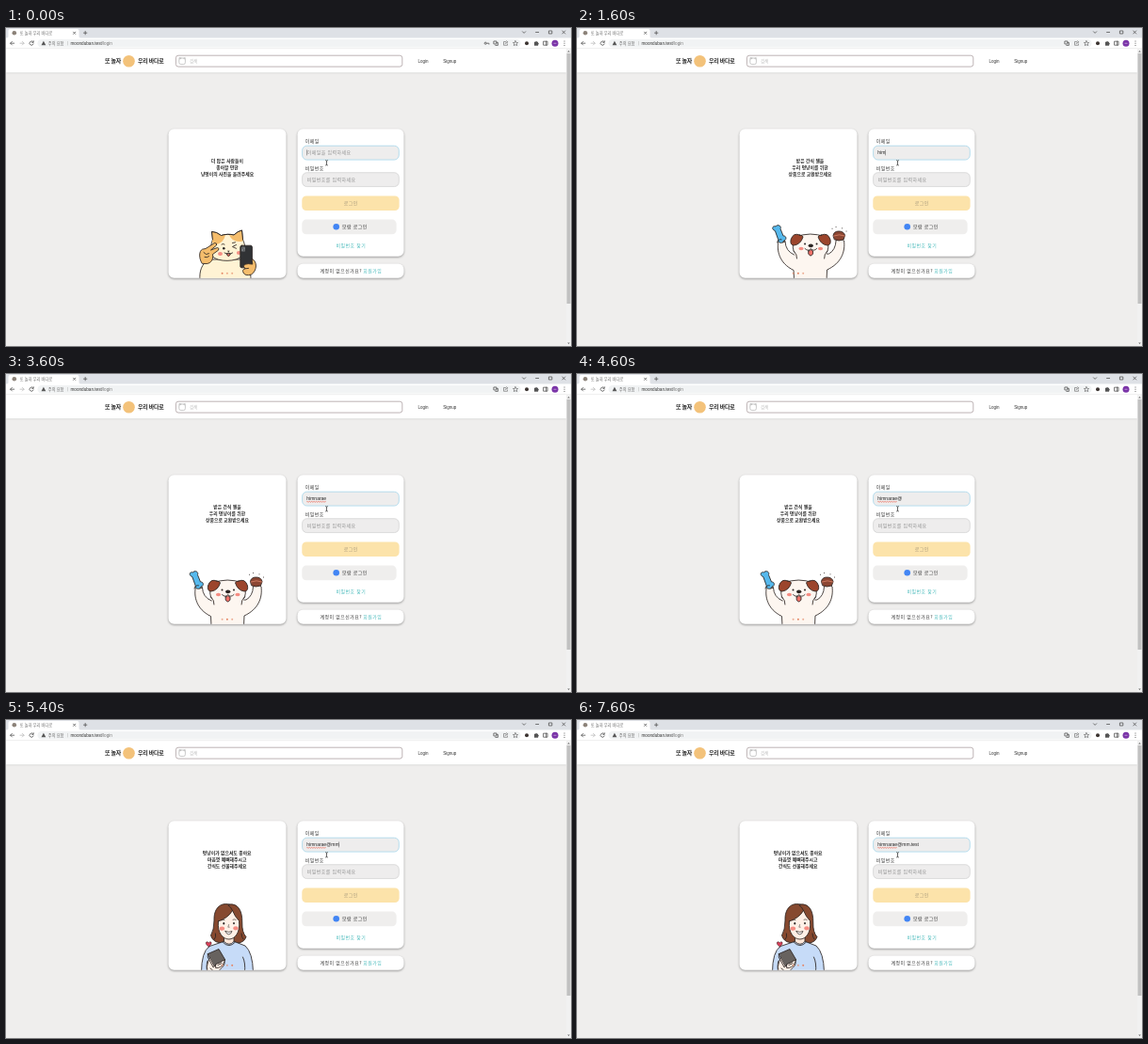
An HTML page that plays this animation: 600x338 px, repeating every 8000 ms.

```html
<!DOCTYPE html>
<html lang="ko">
<head>
<meta charset="utf-8">
<title>또 놀자 우리 바다로</title>
<style>
  html, body { margin: 0; width: 100%; height: 100%; overflow: hidden; background: #efeeed; }
  svg { display: block; width: 100vw; height: 100vh; }
  text { font-family: "Noto Sans CJK KR", "Noto Sans CJK", "Noto Sans", sans-serif; fill: #333; white-space: pre; }
  .ui { font-size: 4.9px; letter-spacing: .5px; }
  .latin { font-family: "Liberation Sans", Arial, sans-serif; }
  .small { font-size: 4.2px; fill: #666; }
  .mid { text-anchor: middle; }
  .hand { font-size: 4.8px; font-weight: 700; letter-spacing: .04px; fill: #222; text-anchor: middle; }
  .brand { font-size: 6px; font-weight: 700; letter-spacing: -.3px; fill: #222; }
  .hint { fill: #8d8d8d; }
  .link { fill: #45b9ba; }
  .card { fill: #fff; filter: drop-shadow(0 1px 1.1px rgba(0,0,0,.36)); }
  .icon { fill: none; stroke: #555; stroke-width: .8; stroke-linecap: round; stroke-linejoin: round; }
  .pale { stroke: #bbb; }
  .art { stroke: #2b2422; stroke-width: .85; stroke-linecap: round; stroke-linejoin: round; }
  .line { fill: none; }
  .flat { stroke: none; }
  .ink { fill: #2b2422; stroke: none; }
  .blush { fill: #f58d83; stroke: none; }
  #strip { animation: strip 8s infinite; }
  @keyframes strip {
    0% { transform: translateX(0); }
    16.125% { transform: translateX(0); animation-timing-function: ease; }
    22.375% { transform: translateX(-125px); }
    58.75% { transform: translateX(-125px); animation-timing-function: cubic-bezier(.2,.85,.3,1); }
    65%, 100% { transform: translateX(-250px); }
  }
</style>
</head>
<body>
<svg viewBox="0 0 600 338" preserveAspectRatio="none">
  <defs>
    <clipPath id="frame"><rect x="172.5" y="107.3" width="125" height="158.5" rx="6"/></clipPath>
  </defs>
  <rect width="600" height="338" fill="#efeeed"/>

  <!-- site header -->
  <rect y="22" width="595" height="25.3" fill="#fff" style="filter:drop-shadow(0 .5px .8px rgba(0,0,0,.18))"/>
  <text class="brand" x="105" y="37.3">또 놀자</text>
  <circle cx="130.5" cy="35.2" r="6.3" fill="#f3c27a"/>
  <text class="brand" x="140" y="37.3">우리 바다로</text>
  <rect x="180.4" y="29.2" width="240.4" height="11.9" rx="2.6" fill="#fff" stroke="#aca0a1" stroke-width=".8"/>
  <rect class="icon pale" x="183.8" y="32" width="6.6" height="6.6" rx="2"/>
  <path class="icon pale" d="M184 33v-1.6l1.6.8M190.2 33v-1.6l-1.6.8"/>
  <text class="small" x="195.3" y="36.6" style="fill:#b5b5b5">검색</text>
  <text class="latin" x="437.5" y="36.8" font-size="4.5">Login</text>
  <text class="latin" x="464.3" y="36.8" font-size="4.5">Signup</text>

  <!-- browser bar -->
  <rect width="600" height="11" fill="#dee1e6"/>
  <path d="M0 11q2.5 0 2.500-2.500V3q0-2 2-2H75.500q2 0 2 2v5.500q0 2.500 2.500 2.500z" fill="#fff"/>
  <rect y="10.500" width="600" height="11.300" fill="#fff"/>
  <rect y="21.700" width="600" height=".4" fill="#dcdcdc"/>
  <circle cx="8.800" cy="5.200" r="2.300" fill="#8b8178"/>
  <text class="small" x="14.800" y="6.800">또 놀자 우리 바다로</text>
  <path class="icon" d="M71.500 4.200l2.200 2.200m0-2.200l-2.200 2.200M82.500 5.200h3.400m-1.700-1.700v3.400"/>
  <path class="icon" d="M548.500 3.800l1.600 1.600 1.600-1.600M562.600 4.500h3M576.800 3h3v3h-3zM590.800 3l3 3m0-3l-3 3"/>
  <path class="icon" d="M8.700 16.200H4.600m1.800-1.800l-1.800 1.800 1.800 1.800"/>
  <path class="icon pale" d="M15 16.200h4.100m-1.800-1.800l1.800 1.800-1.800 1.800"/>
  <path class="icon" d="M28.900 15a2.100 2.100 0 1 0 .2 1.900M29.200 13.700V15.300h-1.600"/>
  <rect x="33.500" y="12" width="513" height="8.600" rx="4.300" fill="#f1f3f4"/>
  <path d="M39.900 13.800l2.400 4.400h-4.800z" fill="#555"/>
  <text class="small" x="44.800" y="17.800">주의 요함</text>
  <rect x="65.400" y="14" width=".4" height="4.400" fill="#aaa"/>
  <text class="latin" x="68.500" y="17.700" font-size="4.650">moonduban.test<tspan fill="#777">/login</tspan></text>
  <path id="key" class="icon" d="M510.300 16.200a1.100 1.100 0 1 0-2.200 0 1.100 1.100 0 1 0 2.200 0h2.600v1"/>
  <path class="icon" d="M518.300 14h2.600v3h-2.600zM520.900 15.400h1.500v3h-2.600"/>
  <path class="icon" style="stroke:#888" d="M530.500 14.500h-2v3.800h4v-1.300M530 16.800q.3-2 2.700-2m-1.100-1.100l1.200 1.100-1.200 1.100"/>
  <path class="icon" style="stroke-width:.6" d="M541 13.700l.8 1.700 1.800.2-1.300 1.200.4 1.800-1.700-.9-1.700.9.400-1.800-1.300-1.200 1.800-.2z"/>
  <circle cx="553" cy="16.300" r="2" fill="#3c3431"/>
  <path d="M561 14.700h1.300a.8.800 0 1 1 1.600 0h1.200v1.300a.8.800 0 1 1 0 1.600v1.200H561z" fill="#555"/>
  <path class="icon" d="M571 14.200h4v4h-4zM573.600 14.200v4"/>
  <circle cx="583" cy="16.200" r="3.500" fill="#7b35a8"/>
  <path d="M581.500 16.300h3" stroke="#d9c4e6" stroke-width=".6"/>
  <path class="icon" style="stroke-width:1" d="M593 14v.1M593 16.200v.1M593 18.400v.1"/>

  <rect x="595" y="22" width="5" height="316" fill="#f1f1f1"/>
  <rect x="595.500" y="27" width="4" height="266" fill="#c1c1c1"/>
  <path d="M596.200 25.500l1.300-1.600 1.300 1.600zM596.200 334.500l1.300 1.600 1.300-1.600z" fill="#666"/>

  <!-- carousel -->
  <rect class="card" x="172.500" y="107.300" width="125" height="158.500" rx="6"/>
  <g clip-path="url(#frame)">
    <g id="strip">
      <g>
        <text class="hand" x="235" y="143.200">더 많은 사람들이</text>
        <text class="hand" x="235" y="150">좋아할 만한</text>
        <text class="hand" x="235" y="156.700">냥멍이의 사진을 올려주세요</text>
        <g class="art">
          <path d="M206 268C205 258 208 251 215 246H252C258 250 260 258 260 268z" fill="#fff3d4"/>
          <path d="M218.500 240C217 233 218 228 219.500 225L218.500 216.500Q223.500 216.500 228.500 220.500C233 219 238 219 242 220Q246 216 250.500 215L251.500 225C254.500 231 254.500 237 251 242C245 249 225 249 219.500 243z" fill="#fff3d4"/>
          <path class="flat" d="M219 227.500L219 217Q224 217 228.500 220.800L233 220Q231 229 222 230.500z" fill="#f5bd6c"/>
          <path class="flat" d="M237 220L242 220.500Q246 216.500 250.200 215.500L251.500 226.500Q241 229 237 220z" fill="#f5bd6c"/>
          <path class="line" d="M219.500 225L218.500 216.500Q223.500 216.500 228.500 220.500C233 219 238 219 242 220Q246 216 250.500 215L251.500 225"/>
          <circle class="ink" cx="231.300" cy="234.300" r="1.300"/>
          <path class="line" d="M244.500 230.500l-4 2 4 1.800M229 230q1.500-1.200 3 0M240.500 228.500l3-.7M232 239q2.500 2 4.300 0 2 2 4.300 0"/>
          <path class="ink" d="M234.900 236.800h2.800l-1.400 1.500z"/>
          <path d="M234.300 240.200q2 5 4 0z" fill="#e8685c"/>
          <ellipse class="blush" cx="227.500" cy="240" rx="2.500" ry="1.900"/>
          <ellipse class="blush" cx="247.300" cy="239" rx="2.400" ry="1.900"/>
          <path d="M208 250C204.500 244 205 237 208.500 235.200L212 234.500L221.500 228.500Q224.500 228.500 223.500 231L217.500 236L224.500 233.500Q227 234 225.500 236.200L219.500 240.500C220.500 245.500 218 250 213.500 250.500z" fill="#f5bd6c"/>
          <path class="line" d="M210 238.500l2.500 2 3-.8M211 243.500q2.500 1 4.500-.8"/>
          <rect x="248.800" y="231.200" width="12.600" height="23.600" rx="1.600" fill="#303235"/>
          <rect class="flat" x="250" y="232.600" width="4" height="5" rx="1.200" fill="#75797d"/>
          <path d="M251.300 234v.1M252.800 236v.1" stroke="#111"/>
          <path d="M261.400 245.500C267 247.500 267 258 260.500 262Q254 264 252 260Q250.500 256.500 254 255.800Q251 253 253.500 251.300Q257 250 261.400 251z" fill="#f5bd6c"/>
          <path class="line" d="M254 255.800l3.500-.4"/>
        </g>
      </g>

      <g transform="translate(125)">
        <text class="hand" x="235" y="143.200">받은 간식 젤을</text>
        <text class="hand" x="235" y="150">우리 멍냥이를 위한</text>
        <text class="hand" x="235" y="156.700">상품으로 교환받으세요</text>
        <g class="art">
          <path d="M201.500 226C199 236 202 250 217.500 257.500L218 268H252.500L253 257C268 250 272.500 238 271 226Q267 221 262.500 226Q262 236 255 240L218 241Q209 237 208.500 227Q205 222 201.500 226z" fill="#fdf6f0"/>
          <path d="M197.500 215.500C193.500 214 195 209.500 198.500 211C199.500 208.500 205 209.500 203.500 213.500L206.500 221C210 220.500 210.500 225.500 207 226C206.500 229.500 200.500 229 201 225z" fill="#56b9ed"/>
          <path class="line" d="M200 228Q201 224 204.500 224.800M206 228l2.500-1"/>
          <path d="M259.500 220.500Q260 216 265.500 216Q271 216 272 220.500L270.500 225Q265.500 227 261 225z" fill="#8b4633"/>
          <path class="line" d="M260 221Q266 218.500 272 221" stroke="#d98268"/>
          <path class="line" d="M258.500 213.200v.1M262.500 211.500v.1M273.500 216v.1M269 212.800v.1"/>
          <path d="M220 222Q235 216 251 222Q256 229 253.500 237Q248 244.500 235 244.500Q222 244 217.500 237Q215 229 220 222z" fill="#fdf6f0"/>
          <path class="flat" d="M218.500 238.500H252.500L251.500 250H219z" fill="#fdf6f0"/>
          <path class="line" d="M217.500 237q4 3.500 3.500 8M253.500 237q-4 3.500-3.500 8"/>
          <path id="ear" d="M224 220Q217 217 214.500 225Q213.500 231 218 231Q225 230 227.500 222Q227 220 224 220z" fill="#9c452c"/>
          <use href="#ear" transform="matrix(-1 0 0 1 471 0)"/>
          <circle class="ink" cx="229.500" cy="229.500" r="1"/>
          <circle class="ink" cx="242" cy="229.500" r="1"/>
          <ellipse class="ink" cx="235.700" cy="231.300" rx="2.600" ry="1.900"/>
          <path class="line" d="M229.500 234.500q3.500 3.500 6.200 0 3 3.500 6.300 0"/>
          <path d="M233.200 237v3q2.300 4 4.800 0V237q-1.500-.5-2.300-1.500-.8 1.500-2.500 1.500z" fill="#ef7068"/>
          <ellipse class="blush" cx="225.500" cy="234.500" rx="2.600" ry="1.800"/>
          <ellipse class="blush" cx="246" cy="234.500" rx="2.600" ry="1.800"/>
        </g>
      </g>

      <g transform="translate(250)">
        <text class="hand" x="234.700" y="143.200">멍냥이가 없으셔도 좋아요</text>
        <text class="hand" x="234.700" y="150">마음껏 예뻐해주시고</text>
        <text class="hand" x="234.700" y="156.700">간식도 선물해주세요</text>
        <g class="art">
          <path d="M237 196C227 193.500 220.500 201 221 213Q221 223 217.500 229Q219.500 235.500 226 236.500L247 237Q253 236 255 230.500Q250.500 226 250.800 215C251 202 246 194.500 237 196z" fill="#86492f"/>
          <path d="M207.500 268Q207.500 246.500 216 240.500L231 235.500H242.500L254 240Q262 247 262.500 268z" fill="#c6dbf8"/>
          <path d="M231.500 228v7.500Q237 241 242 235.500V227z" fill="#fde6d8"/>
          <path class="line" d="M230 236Q237 243.500 243.500 236"/>
          <path d="M225.500 214C224 227 231 233 236.800 233C243 233 249 226 247.500 213.500Q243 209 240.500 202.500Q236 210.500 225.500 214z" fill="#fff0e6"/>
          <path class="line" d="M240.500 202.500Q239 198.500 236 197M222.500 227q1 4-1.500 6.500M250 227q0 4 2 6"/>
          <path class="line" d="M228.800 212.800q1.600-1.100 3.200-.3M241 212.200q1.600-1 3.200.2" style="stroke-width:.6"/>
          <ellipse class="ink" cx="231.300" cy="216.300" rx=".9" ry="1.200"/>
          <ellipse class="ink" cx="242" cy="216.100" rx=".9" ry="1.200"/>
          <path class="line" d="M236.600 217.500l-.8 2.700h1.400" style="stroke-width:.5"/>
          <ellipse class="blush" cx="229.500" cy="221.700" rx="2.700" ry="2.100"/>
          <ellipse class="blush" cx="244" cy="221.300" rx="2.700" ry="2.100"/>
          <path d="M233 224.500q4 1.800 7 0-1 3.300-3.500 3.300t-3.500-3.300z" fill="#fff" style="stroke-width:.7"/>
          <path d="M215.300 241Q211 237.800 212.700 236Q214.500 235 215.300 237Q216.500 235 218 236.200Q219.200 238 215.300 241z" fill="#d9405a" stroke-width=".5"/>
          <path class="line" d="M253.500 268Q254.500 258 251.500 252M214 256Q212.500 260 213.500 268"/>
          <path d="M214 268Q212.500 262 214.500 257L217 251L231 253Q234 259 229.500 263L224.500 268z" fill="#fff0e6"/>
          <path d="M214.500 248.500L226 243.500L232.800 255L221.500 261.500z" fill="#67625f"/>
          <path class="line" d="M214.500 248.500l-.3 3.500 6 11 1.300-1.500"/>
          <path d="M223 263.500q5 .5 8-4.500l1.500-4q-3 .5-4.500 2.500l-5 2z" fill="#fff0e6"/>
          <path class="line" d="M225 260.500l4-1.800M217 264l2.500 2"/>
        </g>
      </g>
    </g>
    <g id="dots" fill="#e58462">
      <circle cx="229.600" cy="260.800" r="1"/>
      <circle cx="234.900" cy="260.800" r="1"/>
      <circle cx="240.200" cy="260.800" r="1"/>
    </g>
  </g>

  <!-- login form -->
  <rect class="card" x="309.500" y="107.300" width="113" height="135.500" rx="6"/>
  <rect class="card" x="309.500" y="250.600" width="113" height="15.200" rx="6"/>
  <text class="ui" x="317.800" y="122.400">이메일</text>
  <rect x="314.600" y="125.200" width="102.700" height="14.900" rx="5" fill="#eeeded" stroke="#9bd3ea" stroke-width=".7"/>
  <text id="hint" class="ui hint" x="319.700" y="134.200">이메일을 입력하세요</text>
  <text id="mail" class="latin" x="319.300" y="134.200" font-size="5" style="fill:#222"></text>
  <path id="wave" fill="none" stroke="#e8432e" stroke-width=".6"/>
  <rect id="caret" y="129.500" width=".4" height="5.900" fill="#222"/>
  <text class="ui" x="317.800" y="151">비밀번호</text>
  <rect x="314.600" y="153.700" width="102.700" height="14.900" rx="5" fill="#eeeded" stroke="#c8c8c8" stroke-width=".6"/>
  <text class="ui hint" x="319.700" y="162.700">비밀번호를 입력하세요</text>
  <rect x="314.300" y="178.500" width="103.300" height="15.500" rx="4.500" fill="#fce3aa"/>
  <text class="ui mid" x="366.200" y="188.100" style="fill:#a3977b">로그인</text>
  <rect x="314.300" y="203.600" width="100.300" height="15.600" rx="4.500" fill="#efeeed"/>
  <circle cx="350.700" cy="211.300" r="3.300" fill="#4285f4"/>
  <text class="ui" x="356.900" y="213.100">모람 로그인</text>
  <text class="ui mid link" x="366.400" y="232.900">비밀번호 찾기</text>
  <text class="ui" x="333.400" y="259.900">계정이 없으신가요?</text>
  <text class="ui link" x="379.200" y="259.900">회원가입</text>

  <path d="M339.200 140.700q1.300 0 1.300.7 0-.7 1.300-.7M340.500 141.400v3.900M339.200 146q1.300 0 1.300-.7 0 .7 1.300.7" fill="none" stroke="#222" stroke-width=".7"/>
</svg>
<script>
  const LOOP = 8000, LEFT = 319.3;
  const MAIL = "himnarae@mm.test";
  const KEYS = [1000, 1200, 1500, 1700, 2500, 2600, 3000, 3100, 4100,
                5200, 5400, 6100, 6600, 6700, 6900, 7100];
  const $ = id => document.getElementById(id);
  const mail = $("mail"), caret = $("caret"), dots = [...$("dots").children];
  const show = (el, on) => el.setAttribute("visibility", on ? "visible" : "hidden");

  $("wave").setAttribute("d", `M${LEFT} 135.8q.6-.9 1.2 0` + "t1.2 0".repeat(16));

  function draw(t) {
    const count = KEYS.filter(k => k <= t).length;
    const last = count ? KEYS[count - 1] : -100;
    const text = MAIL.slice(0, count);
    if (mail.textContent !== text) mail.textContent = text;
    caret.setAttribute("x", LEFT + (count ? mail.getComputedTextLength() : 0));
    show(caret, (t - last) % 1000 < 500);
    show($("hint"), !count);
    show($("key"), t < 1000);
    show($("wave"), t >= 3600);
    const active = t < 1290 ? 0 : t < 4700 ? 1 : 2;
    dots.forEach((dot, i) => dot.setAttribute("opacity", i === active ? 1 : .65));
  }

  let start;
  function tick(now) {
    start ??= now;
    draw((now - start) % LOOP);
    requestAnimationFrame(tick);
  }
  draw(0);
  requestAnimationFrame(tick);
</script>
</body>
</html>
```
